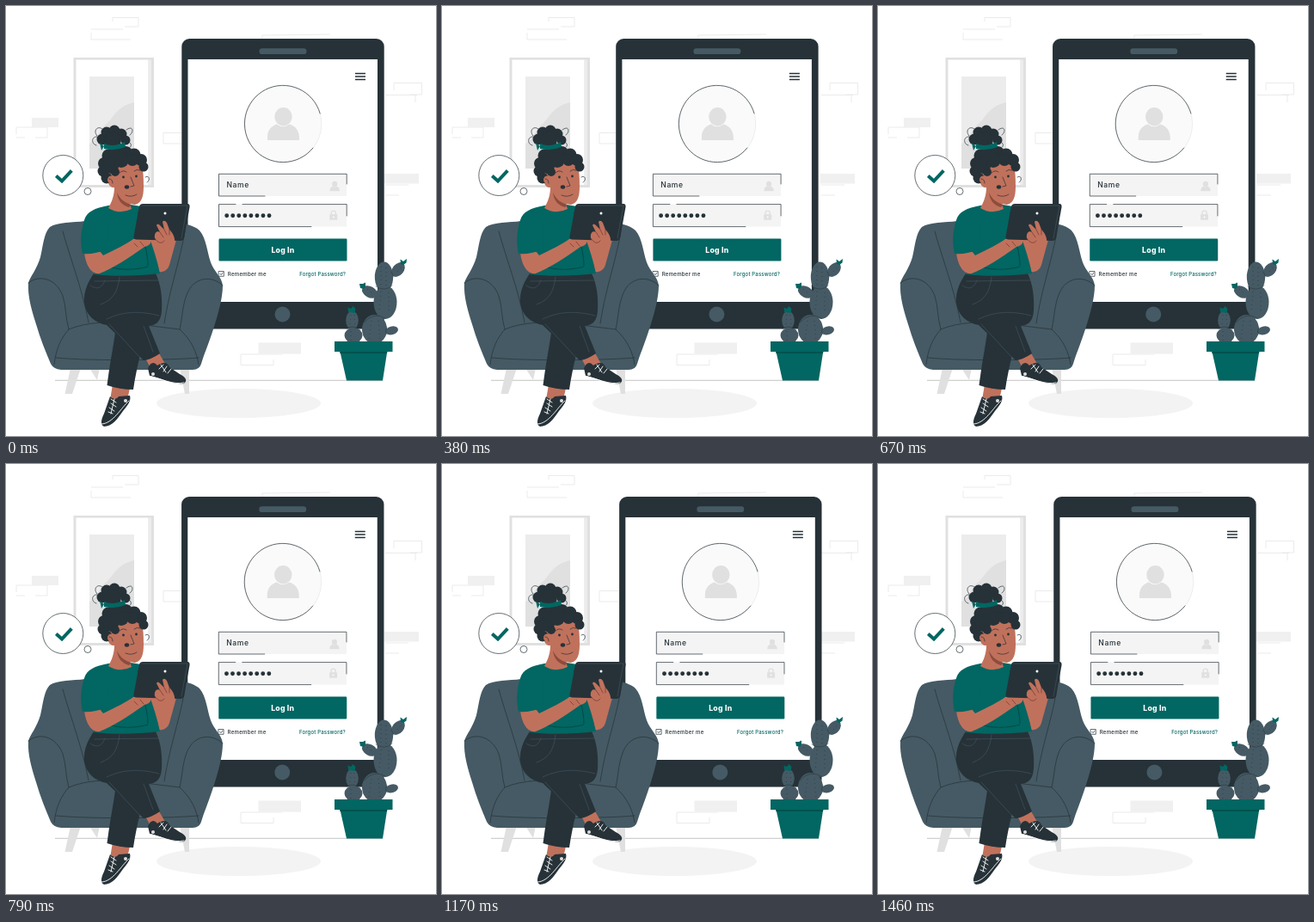
An HTML page that plays this animation: 500 by 500 pixels, repeating every 1.5 s.

```html
<!DOCTYPE html>
<html lang="en">
<head>
<meta charset="utf-8">
<title>Log in</title>
<style>
  html, body { margin: 0; width: 100%; height: 100%; overflow: hidden; background: #fff; }
  svg { display: block; width: 100vw; height: 100vh; }
  text { font-family: Inter, "Open Sans", sans-serif; font-weight: 500; fill: #263238; }
  .dark { fill: #263238; }
  .slate { fill: #455a64; }
  .teal { fill: #026662; }
  .skin { fill: #c0715c; }
  .pale { fill: #e0e0e0; }
  .line { fill: none; stroke: #263238; stroke-width: .7; stroke-linecap: round; stroke-linejoin: round; }
  .fine { fill: none; stroke: #e6e6e6; stroke-width: .8; }
  .white { fill: none; stroke: #fff; stroke-width: .9; stroke-linecap: round; }
  .seam { fill: none; stroke: #4d5f68; stroke-width: .5; stroke-linecap: round; }
</style>
</head>
<body>
<svg viewBox="0 0 500 500">
  <!-- wall and floor -->
  <g class="fine">
    <path d="M124 13.5H154V24H138M124 13.5V18M99 31V39H145M99 27H136M298 38V34L377 33"/>
    <path d="M451 98V89.500H483.500V103H470M441 103.500H478M441 208H468M441 220H457M476 104V112"/>
    <path d="M12 149V141H48V153H34M12 153H22M205 147.500H183V160H205M273 417.500V405H321M273 417.500H311V411"/>
  </g>
  <path fill="#f0f0f0" d="M30 130H61V141H30ZM440 195H480V206.500H440ZM293.500 391.500H343V404.500H293.500Z"/>
  <ellipse cx="270.500" cy="462" rx="95.500" ry="17" fill="#f3f3f3"/>
  <path d="M57 435.300H438" stroke="#b5b5b5" stroke-width=".8"/>

  <!-- picture -->
  <path class="pale" d="M78.500 60H172V211H78.500Z"/>
  <path fill="#fff" d="M81.500 62.500H165.500V208H81.500Z"/>
  <path fill="#ececec" d="M165.500 62.500H169V208H165.500ZM97 82H149V189H97Z"/>
  <path class="pale" d="M97 189V160C105 158 107 145 117 137C126 129 128 117 149 112V189Z"/>

  <!-- phone -->
  <g id="phone">
    <rect class="dark" x="204.300" y="38" width="235.400" height="337.500" rx="9"/>
    <path fill="#fff" d="M211.500 62H432V344H211.500Z"/>
    <rect class="slate" x="294.500" y="49.300" width="55" height="6.800" rx="3.400"/>
    <circle class="slate" cx="321.500" cy="358.500" r="9"/>
    <path class="line" style="stroke-width:1.300;stroke-linecap:butt" d="M406 78.500H418M406 82H418M406 85.500H418"/>

    <circle cx="322.200" cy="137.200" r="44.700" fill="#fafafa" stroke="#ddd" stroke-width=".5"/>
    <path class="line" d="M365.200 125A44.700 44.700 0 1 0 357 165"/>
    <g id="user" class="pale">
      <ellipse cx="322.500" cy="128.700" rx="10.200" ry="10.700"/>
      <path d="M304 156V152C304 144 309 139.500 315 137.500Q322 143 329.500 137.500C336 139.500 340.500 144 341 152V156Z"/>
    </g>

    <path fill="#f4f4f4" d="M247.500 195.300H396.200V221H247.500ZM247.500 230.600H396.200V256.600H247.500Z"/>
    <path class="line" d="M301 221H247.500V195.300H396.200V207M355 256.600H247.500V230.600H267M275 230.600H396.200V244"/>
    <text x="256.400" y="210.700" font-size="8.600" letter-spacing=".6">Name</text>
    <use href="#user" transform="translate(284.800 168.200) scale(.302)"/>
    <path d="M256.700 243.800H307" stroke="#263238" stroke-width="4.900" stroke-linecap="round" stroke-dasharray="0 7.050"/>
    <rect class="pale" x="376.300" y="242.300" width="9" height="6.500" rx=".6"/>
    <path d="M378.200 243V240.700A2.600 2.600 0 0 1 383.400 240.700V243" fill="none" stroke="#e0e0e0" stroke-width="1.400"/>
    <circle cx="380.800" cy="245.400" r=".9" fill="#fff"/>

    <rect class="teal" x="247.500" y="270.500" width="149" height="26" rx="1.200"/>
    <text x="322" y="286.500" font-size="8.700" letter-spacing=".25" text-anchor="middle" style="font-weight:800;fill:#fff">Log In</text>
    <rect class="line" x="247.500" y="308.500" width="5.800" height="5.800"/>
    <path class="line" d="M248.900 311.300L250.200 312.700L252.200 310"/>
    <text x="257.800" y="313.500" font-size="6.100" letter-spacing=".25">Remember me</text>
    <text x="341.200" y="313.500" font-size="6" letter-spacing=".16" style="fill:#026662">Forgot Password?</text>
  </g>

  <!-- cactus -->
  <g class="slate">
    <ellipse cx="404" cy="383" rx="10.500" ry="9"/>
    <ellipse cx="402.500" cy="365.500" rx="7.300" ry="11"/>
    <ellipse cx="448.500" cy="377.500" rx="7.500" ry="4.800" transform="rotate(-15 448 377)"/>
    <ellipse cx="428.500" cy="376" rx="14.500" ry="17"/>
    <ellipse cx="441" cy="344.500" rx="13.500" ry="19.500"/>
    <ellipse cx="439.500" cy="315" rx="10.700" ry="17.500"/>
    <ellipse cx="423" cy="332" rx="9.500" ry="6.500" transform="rotate(28 422 332)"/>
    <ellipse cx="456" cy="306.500" rx="9.500" ry="6.500" transform="rotate(-50 456 306.500)"/>
  </g>
  <path class="line" style="stroke-width:.5" d="M430 326Q440 333 449 325M416 368Q428 355 441 363M396 375Q404 370 412 377M448 309L451 315M443 374Q440 378 443 382"/>
  <path d="M436 303V328M442 304V327M436 332L434 357M445 333V357M425 366L422 389M433 366L435 389M401 359L400 373M405 359L406 373M401 378V389M420 329L426 334M455 309L461 302" fill="none" stroke="#263238" stroke-width=".6" stroke-dasharray="1 4"/>
  <path class="teal" d="M459 300L458.500 294.500L462 297L466 294L465.500 298.500L462 301ZM412 328L411 323L415 323L418 321.500L418 326L416 329ZM398 356L397.500 350.500L401 352L403.500 349L406.500 352L405.500 357Z"/>
  <path class="teal" d="M388 400H443.500L438 435.500H396Z"/>
  <path fill="#00524d" d="M388 401.500H443.500L443 404H388.500Z"/>
  <path class="teal" d="M382 390H449.500V402H382Z"/>

  <!-- armchair -->
  <path class="pale" d="M75 421H87L77 451H68.500ZM97 421H109L106 435ZM202 421H213V451H208Z"/>
  <path class="slate" d="M26 322C28 315 36 306 40 292C43 279 44 264 51 257C60 251 78 252 92 250H186C204 251 219 255 225 261C233 270 234 287 238 298C242 309 251 315 252 325C252 339 247 358 240 379C235 394 230 406 227 416Q225 423 217 423H64Q55 422 52 416C46 402 40 387 35 370C30 354 25 338 26 322Z"/>
  <path class="line" d="M26 322C38 312 58 316 66 337C70 349 69 362 73 376C64 386 58 399 56 417M252 325C240 313 218 314 210 336C205 349 205 363 202 376C216 389 222 403 224 417M73 376C94 367 121 367 145 369L202 376M58 409C100 413 190 412 224 409M66 262C76 298 89 330 96 368M208 262C202 298 191 325 184 369"/>

  <!-- legs -->
  <path class="skin" d="M157 400L173 395L185 416L179 428L167 419ZM124 440H145L141 458L128 464L121 458Z"/>
  <path class="dark" d="M127 380L160 368L164 378C158 396 152 420 148 446Q132 446 117.500 441C120 421 124 400 127 380Z"/>
  <path class="dark" d="M102 311H174C180 323 182 339 181 354C180 368 174 371 166 372L179 404Q169 411 160 412L117 371C103 368 93 360 91 345C90 331 96 320 102 311Z"/>
  <path class="seam" d="M103 320L177 319M117 364C138 354 158 355 178 360M157 410L120 370M132 315C130 333 124 342 110 347M98 325C107 331 112 327 115 319M160 372L171 402"/>
  <path class="dark" d="M165 421C168 414 172 413 176 418C184 413 188 415 190 420L202 428C210 432 211 436 207 439C196 441 181 433 167 430Z"/>
  <path class="dark" d="M121 454C125 458 129 457 131 454L144 453C146 459 141 465 136 471C130 480 123 489 114 489C109 487 111 480 114 474Z"/>
  <path class="white" d="M166 430C180 433 194 441 207 438M111 486C124 486 134 467 143 459M178 422L183 417M183 425L187 419M188 427L192 422M180 417L186 426M122 462L128 466M120 467L126 471M119 472L124 474M122 457L128 461M126 457L122 474"/>
  <circle cx="171" cy="428" r="2" fill="#ddd"/><circle cx="139" cy="459" r="2" fill="#ddd"/>

  <!-- far arm, shirt -->
  <path class="skin" d="M160 264C170 274 169 292 166 304C175 312 187 311 190 301L198 272L190 249Z"/>
  <path class="teal" d="M119 232C103 235 94 239 91 249C87 261 86 275 89 287L106 285L102 312C127 315 153 314 179 311C176 296 171 281 166 267L157 233Q139 229 119 232Z"/>
  <path d="M109 298C125 308 147 308 165 303M158 261C160 274 165 288 165 302M153 240C158 245 157 252 156 259" fill="none" stroke="#00403c" stroke-width=".7"/>

  <!-- head and hair -->
  <path class="skin" d="M121 193C135 180 150 178 157 184C160 191 160 201 160 210C160 221 158 229 150 231L144 230L146 236Q132 243 119 235C123 228 126 220 126 211C118 212 116 198 121 197Z"/>
  <path fill="#8f4b3b" d="M129 217C132 224 138 229 146 231L143 234C135 232 130 226 129 217Z"/>
  <g class="dark">
    <circle cx="112" cy="155" r="6.500"/><circle cx="117" cy="147" r="6.500"/>
    <circle cx="126" cy="145" r="6.500"/><circle cx="134" cy="149" r="6.500"/>
    <circle cx="139" cy="156" r="5.500"/><circle cx="124" cy="156" r="10"/>
    <circle cx="119" cy="174" r="7.500"/><circle cx="128" cy="171" r="8"/>
    <circle cx="139" cy="171" r="8"/><circle cx="149" cy="173" r="7.500"/>
    <circle cx="157" cy="179" r="7"/><circle cx="160" cy="187" r="5.500"/>
    <circle cx="114" cy="183" r="7"/><circle cx="113" cy="192" r="6.500"/>
    <circle cx="117" cy="200" r="6.500"/><circle cx="122" cy="186" r="9"/>
    <circle cx="134" cy="179" r="9"/><circle cx="147" cy="179" r="7"/>
    <circle cx="127" cy="193" r="5"/>
  </g>
  <circle class="skin" cx="122.500" cy="202" r="4.500"/>
  <path class="line" d="M105 162C98 160 100 151 106 152M106 151C100 144 108 138 113 144M140 144C148 138 149 147 144 150M143 158C149 162 143 168 138 163M162 199C167 196 168 203 164 205"/>
  <path class="teal" d="M114 160Q125 165 138 158L139 164Q126 169 114 166ZM114 163L109 159L111 168Z"/>
  <path class="line" d="M132 194Q136 190 140 193M149 192Q152 189 156 191M145 199L149 209L145 210M120 201Q124 201 124 206M139 220Q146 223 152 219"/>
  <circle class="dark" cx="136.500" cy="199" r="1.400"/><circle class="dark" cx="151.500" cy="198" r="1.400"/>
  <ellipse class="dark" cx="140.500" cy="210.500" rx="2.700" ry="2.200"/>

  <!-- near arm, tablet, hands -->
  <path class="skin" d="M91 286L109 285L113 290C127 283 140 277 148 271L168 269C171 275 166 279 161 280C143 293 124 305 109 311C98 313 92 298 91 286Z"/>
  <path class="teal" d="M105 239C90 239 86 264 89 288Q102 289 115 284C120 265 121 244 105 239Z"/>
  <path class="dark" d="M159 230H211Q214 230 213.500 234L207 270Q206 273 203 273L151 271.500Q148 271 148.500 268L155 233Q156 230 159 230Z"/>
  <path class="seam" d="M158 232H211L204 270"/>
  <circle cx="185" cy="241" r="1.500" fill="#fff"/>
  <path class="skin" d="M173 270C172 263 176 261 179 263L175 255Q176 252 179 255L184 260L182 251Q184 248 187 252L190 260C194 264 197 269 196 276L190 292L178 279Z"/>
  <path d="M179 263L183 269M184 260L187 266M190 260L190 266M149 276L153 280M156 274L160 279M173 270C177 276 181 277 184 273" fill="none" stroke="#6f382c" stroke-width=".7" stroke-linecap="round"/>

  <!-- thought bubble -->
  <g fill="#fff" stroke="#263238" stroke-width=".7">
    <circle cx="66.300" cy="197" r="23.500"/>
    <circle cx="95" cy="215.500" r="4"/>
  </g>
  <path d="M58.300 197.500L65 203.500L76.300 191.300" fill="none" stroke="#026662" stroke-width="4"/>
</svg>
<script>
  const LOOP = 1500, STEPS = 36;
  // [time, horizontal offset] of the shake
  const keys = [[0, 0], [150, -1], [315, 2], [465, -4], [615, 4], [750, -4],
                [900, 4], [1050, -4], [1200, 2], [1350, -1], [LOOP, 0]];
  const phone = document.getElementById("phone");

  const bezier = (s, a, b) => 3 * (1 - s) ** 2 * s * a + 3 * (1 - s) * s * s * b + s ** 3;

  // the CSS "ease" curve
  function ease(x) {
    let low = 0, high = 1;
    for (let i = 0; i < 24; i++) {
      const mid = (low + high) / 2;
      if (bezier(mid, .25, .25) < x) low = mid; else high = mid;
    }
    return bezier(low, .1, 1);
  }

  function offset(time) {
    const i = keys.findIndex(([end]) => time < end);
    const [t0, x0] = keys[i - 1], [t1, x1] = keys[i];
    return x0 + (x1 - x0) * ease((time - t0) / (t1 - t0));
  }

  function draw(now) {
    const step = Math.floor((now % LOOP + 4) / LOOP * STEPS) % STEPS;
    phone.setAttribute("transform", `translate(${offset(step * LOOP / STEPS).toFixed(2)} 0)`);
    requestAnimationFrame(draw);
  }
  draw(performance.now());
</script>
</body>
</html>
```
